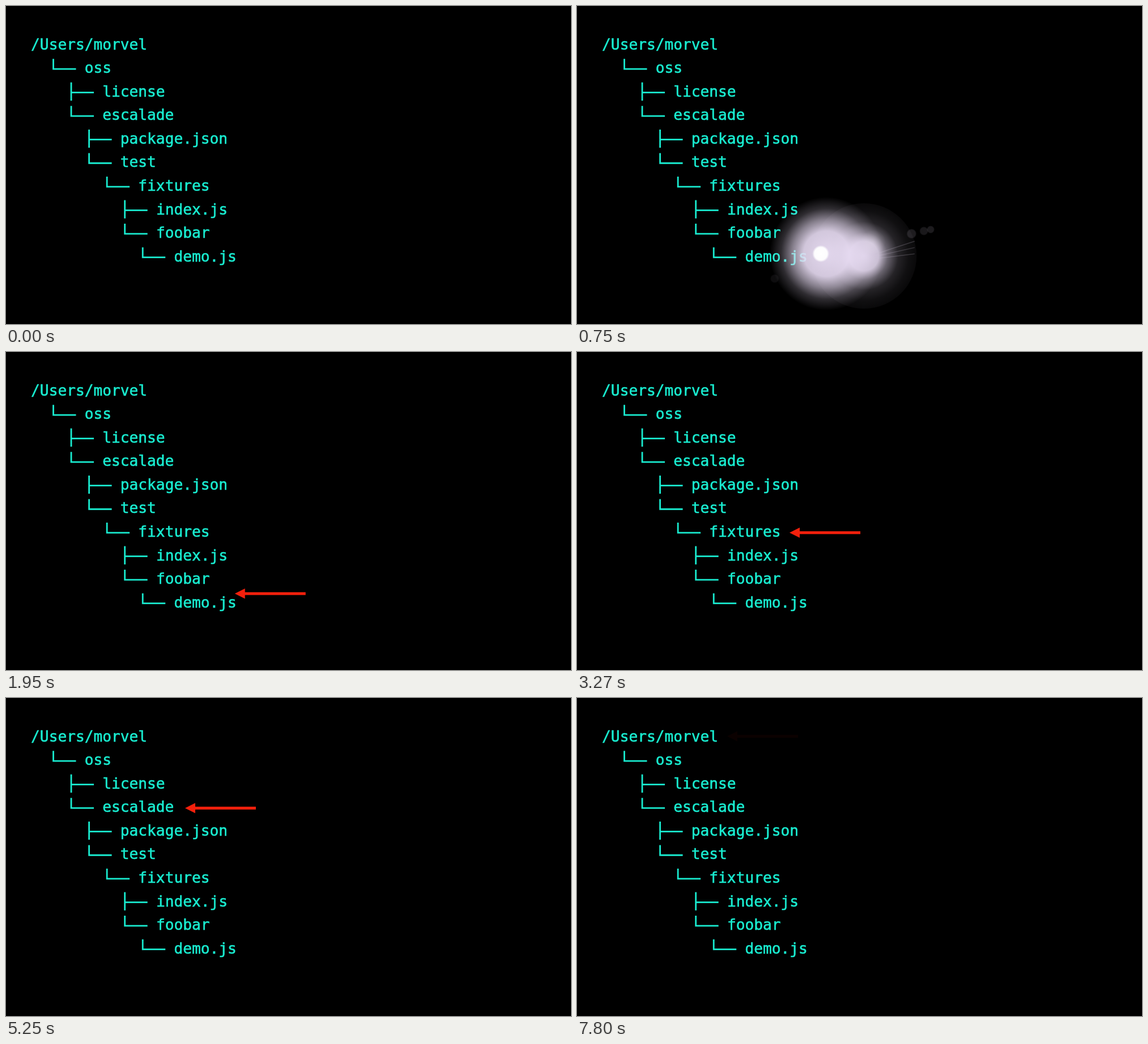
An HTML page with a canvas for the animation above (8.19 s loop, 997 px wide and 561 px high).

```html
<!DOCTYPE html>
<html lang="en">
<head>
<meta charset="utf-8">
<title>Walking up a file tree</title>
<style>
  html, body { margin: 0; width: 100%; height: 100%; overflow: hidden; background: #000; }
  svg, canvas { position: absolute; left: 0; top: 0; width: 997px; height: 561px; }
  text {
    font: 26.2px "DejaVu Sans Mono", monospace;
    fill: #19ecd0; stroke: #19ecd0; stroke-width: .6; white-space: pre;
  }
  .branch { fill: none; stroke: #19ecd0; stroke-width: 2.8; }
  #arrow { fill: #f3200c; }
</style>
</head>
<body>
<svg viewBox="0 0 997 561">
  <clipPath id="reveal"><rect id="window" y="-20" height="40"/></clipPath>
  <g id="tree"></g>
  <g id="arrow"><path clip-path="url(#reveal)" d="M0 0L18 -9V-2.5H125V2.5H18V9Z"/></g>
</svg>
<canvas id="flare" width="997" height="561"></canvas>
<script>
const LOOP = 8190, STEP = 30;
const CELL = 15.77, LINE = 41.55, LEFT = 44.1, BASE = 76.7;
const $ = id => document.getElementById(id);
const tree = $('tree'), arrow = $('arrow'), win = $('window');
const ctx = $('flare').getContext('2d');

// depth, name, has a sibling below
const rows = [
  [0, '/Users/morvel'],
  [1, 'oss'],
  [2, 'license', true],
  [2, 'escalade'],
  [3, 'package.json', true],
  [3, 'test'],
  [4, 'fixtures'],
  [5, 'index.js', true],
  [5, 'foobar'],
  [6, 'demo.js']
];

// start, duration, tip x, tip y
const stops = [
  [0, 0, 422, 444],
  [1690, 575, 379, 402.5],
  [2677, 585, 375, 318.7],
  [3700, 575, 282, 275.5],
  [4690, 575, 316, 194],
  [5680, 575, 200, 111],
  [6670, 575, 265, 67.5]
];

function add(tag, attrs, label) {
  const el = document.createElementNS('http://www.w3.org/2000/svg', tag);
  for (const key in attrs) el.setAttribute(key, attrs[key]);
  if (label) el.textContent = label;
  tree.append(el);
}

rows.forEach(([depth, name, sibling], i) => {
  const y = BASE + i * LINE;
  const col = depth && depth * 2 + 4;
  add('text', { x: LEFT + col * CELL, y }, name);
  if (!depth) return;
  const x = LEFT + (depth * 2 + .5) * CELL;
  const mid = y - 7.2;
  add('path', {
    class: 'branch',
    d: `M${x} ${y - 25}V${sibling ? y + 7.2 : mid + 1.4}M${x} ${mid}H${x + 40}`
  });
});

const clamp = v => Math.min(1, Math.max(0, v));
const ramp = (t, from, to) => clamp((t - from) / (to - from));
const smooth = (t, from, to) => { const p = ramp(t, from, to); return p * p * (3 - 2 * p); };
const sine = p => (1 - Math.cos(Math.PI * p)) / 2;

// Soft disc; stops are pairs of offset and opacity.
function glow(x, y, r, rgb, ...pairs) {
  const g = ctx.createRadialGradient(x, y, 0, x, y, r);
  for (const [at, a] of pairs) g.addColorStop(at, `rgba(${rgb},${a})`);
  ctx.fillStyle = g;
  ctx.beginPath();
  ctx.arc(x, y, r, 0, 7);
  ctx.fill();
}

function drawFlare(t, headX) {
  ctx.clearRect(0, 0, 997, 561);
  const power = smooth(t, 450, 735) * (1 - smooth(t, 920, 1170));
  if (power <= 0) return;
  const size = .4 + .6 * power;
  const headY = 437;
  const at = k => [headX + k * (484.5 - headX), headY - 12 * k * (484.5 - headX) / 54.5];
  const tint = '232,220,243';
  ctx.globalAlpha = power;

  const [bx] = at(1.4);
  glow(bx, 441, 93 * size, tint, [0, .94], [.28, .86], [.45, .45], [.65, .16], [.85, .07], [1, .04]);
  const [gx] = at(.18);
  glow(gx, 437, 100 * size, tint, [0, .97], [.4, .9], [.6, .58], [.8, .2], [1, 0]);

  // Streaks and ghosts lie on the far side of the flare's centre.
  ctx.strokeStyle = 'rgba(200,190,210,.22)';
  ctx.lineWidth = 1.5;
  for (const shift of [-4, 4, 12]) {
    const [x1, y1] = at(1.75), [x2, y2] = at(3.05);
    ctx.beginPath();
    ctx.moveTo(x1, y1 + 24 + shift / 2);
    ctx.lineTo(x2, y2 + 20 + shift * 1.4);
    ctx.stroke();
  }
  for (const [k, r, a] of [[2.95, 9, .13], [3.35, 8, .11], [3.57, 7, .12], [-1.5, 8, .06]]) {
    const [x, y] = at(k);
    glow(x, y + (k < 0 ? 26 : 0), r * size, tint, [0, a], [.75, a], [1, 0]);
  }
  glow(...at(1.7), 22 * size, '250,242,255', [0, .25], [1, 0]);
  glow(headX, headY, 15 * size, '255,255,255', [0, 1], [.75, .95], [1, 0]);
}

function drawArrow(t, headX) {
  let [, , x, y] = stops[0];
  for (const [start, length, toX, toY] of stops.slice(1)) {
    const p = sine(ramp(t, start, start + length));
    x += (toX - x) * p;
    y += (toY - y) * p;
  }
  win.setAttribute('width', t < 700 ? 0 : t < 1020 ? headX - 422 : 130);
  arrow.setAttribute('transform', `translate(${x} ${y})`);
  arrow.setAttribute('opacity', t < 7680 ? 1 : Math.max(.045, 1 - (t - 7650) / 157));
}

const begin = performance.now();
function frame() {
  const now = (performance.now() - begin) % LOOP;
  const t = Math.floor(now / STEP) * STEP;
  const headX = 422 + 125 * smooth(t, 700, 1020);
  drawArrow(t, headX);
  drawFlare(t, headX);
  requestAnimationFrame(frame);
}
frame();
</script>
</body>
</html>
```
